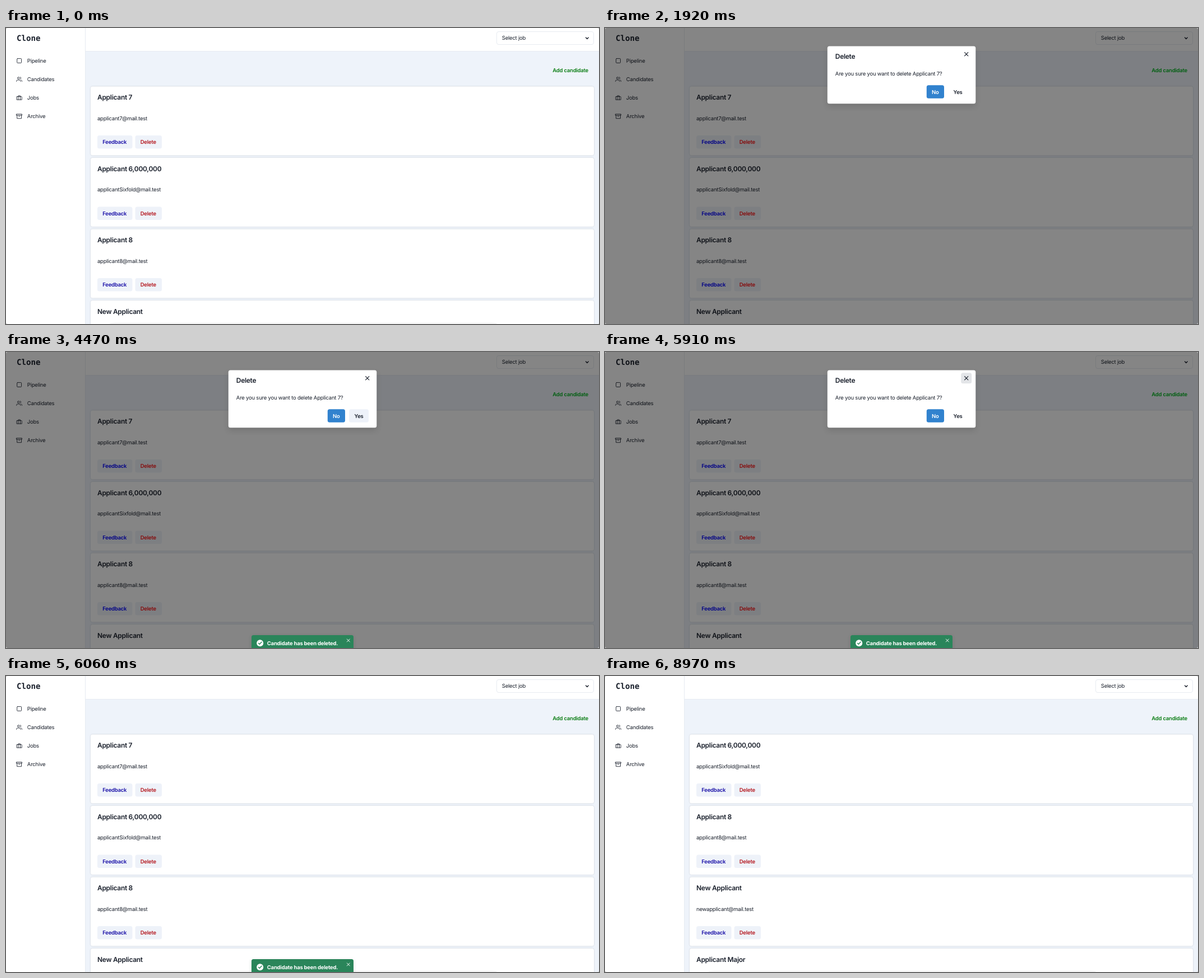
Write an HTML page that moves like this. It is 1058 px wide and 529 px high and loops after 9 s.

```html
<!DOCTYPE html>
<html lang="en">
<head>
<meta charset="utf-8">
<title>Candidates</title>
<style>
  html, body { margin: 0; height: 100%; overflow: hidden; background: #c4c4c4; }
  svg { display: block; width: 100vw; height: 100vh; border-radius: 3px; }
  text { font: 9.5px Inter, sans-serif; letter-spacing: -.023em; fill: #1a202c; white-space: pre; text-rendering: geometricPrecision; }
  .head { font-size: 12px; font-weight: 600; letter-spacing: -.025em; }
  .bold { font-weight: 600; }
  .brand { font: bold 14.1px "DejaVu Sans Mono", monospace; letter-spacing: 0; }
  .blue { fill: var(--blue); }
  .red { fill: var(--red); }
  .green { fill: var(--green); }
  .white { fill: #fff; }
  .card { fill: #fff; filter: drop-shadow(0 .6px .9px rgba(0, 0, 0, .17)); }
  .btn { fill: #eef2f9; }
  .line { fill: none; stroke: #1a202c; stroke-width: 1; stroke-linecap: round; stroke-linejoin: round; }
  .icon { fill: none; stroke: #1a202c; stroke-width: 2; stroke-linecap: round; stroke-linejoin: round; }
  .edge { fill: none; stroke: #e7ebf1; }
  #modal, #toast { transform-box: view-box; }
  #modal { transform-origin: 529px 83.75px; }
  #toast { transform-origin: 529px 520px; }
  .panel { fill: #fff; filter: drop-shadow(0 5px 5px rgba(0, 0, 0, .12)); }
</style>
</head>
<body>
<svg id="stage" viewBox="0 0 1058 529" preserveAspectRatio="none"></svg>
<script>
const people = [
  ['Applicant 7', 'applicant7'],
  ['Applicant 6,000,000', 'applicantSixfold'],
  ['Applicant 8', 'applicant8'],
  ['New Applicant', 'newapplicant'],
  ['Applicant Major', 'applicantmajor']
];

const menu = [
  ['Pipeline', 'M5 3H19a2 2 0 0 1 2 2V19a2 2 0 0 1-2 2H5a2 2 0 0 1-2-2V5a2 2 0 0 1 2-2z'],
  ['Candidates', 'M17 21v-2a4 4 0 0 0-4-4H5a4 4 0 0 0-4 4v2M5 7a4 4 0 1 0 8 0a4 4 0 1 0-8 0M23 21v-2a4 4 0 0 0-3-3.87M16 3.13a4 4 0 0 1 0 7.75'],
  ['Jobs', 'M3 7H21a1.5 1.5 0 0 1 1.5 1.5V20H1.5V8.5A1.5 1.5 0 0 1 3 7zM8 20V3.5H16V20'],
  ['Archive', 'M21 8v13H3V8M1 3h22v5H1zM10 12h4']
];

const text = (x, y, str, cls = '', extra = '') =>
  `<text x="${x}" y="${y}" class="${cls}" ${extra}>${str}</text>`;
const rect = (x, y, w, h, r, attrs) =>
  `<rect x="${x}" y="${y}" width="${w}" height="${h}" rx="${r}" ${attrs}/>`;
const cross = (x, y, r, attrs = '') =>
  `<path class="line" d="M${x - r} ${y - r}L${x + r} ${y + r}M${x + r} ${y - r}L${x - r} ${y + r}" ${attrs}/>`;

const card = ([name, user], i) => `<g transform="translate(0 ${i * 127.5})">
  ${rect(151, 104.5, 898, 123, 3.5, 'class="card"')}
  ${text(163, 128, name, 'head')}
  ${text(163, 164.7, user + '@mail.test')}
  ${rect(163, 192, 62.5, 23.5, 3.5, 'class="btn"')}
  ${rect(230.5, 192, 47.5, 23.5, 3.5, 'class="btn"')}
  ${text(172.2, 207.2, 'Feedback', 'bold blue')}
  ${text(239.7, 207.2, 'Delete', 'bold red')}
</g>`;

const menuItem = ([label, path], i) => {
  const y = 58.5 + i * 33.1;
  return `<path class="icon" d="${path}" transform="translate(18.4 ${y - 5.2}) scale(.435)"/>`
    + text(37.8, y + 3.6, label);
};

const stage = document.getElementById('stage');
stage.innerHTML = `
  <rect width="1058" height="529" fill="#fff"/>
  ${rect(142, 41.5, 916, 488, 0, 'fill="#eef3fa"')}
  <path class="edge" d="M141.5 0V529M142 41.5H1058"/>
  ${text(19, 23.3, 'Clone', 'brand')}
  ${menu.map(menuItem).join('')}
  ${rect(875.5, 6.5, 173, 23, 3.5, 'class="edge"')}
  ${text(884.8, 21.4, 'Select job')}
  <path class="line" d="M1034.5 17l2.3 2.4l2.3-2.4" style="stroke-width:1.4"/>
  ${text(1039, 78.7, 'Add candidate', 'bold green', 'text-anchor="end"')}
  <g id="before">${people.slice(0, 4).map(card).join('')}</g>
  <g id="after">${people.slice(1).map(card).join('')}</g>
  <path id="rim" d="M183 530Q187 527.7 194 527.7H867Q874 527.7 878 530" fill="none" stroke="#e9e9e9"/>
  <path id="glow" d="M165 529Q172 522 200 522H855Q883 522 890 529Z" fill-opacity=".05"/>
  <rect id="dim" width="1058" height="529"/>
  <g id="modal">
    ${rect(396.8, 32.5, 264.5, 102.8, 3.5, 'class="panel"')}
    ${rect(635.2, 37.3, 19, 19, 3.5, 'id="closeHover" fill="#e3e5e8"')}
    ${cross(644.7, 46.7, 3.1, 'style="stroke-width:1.2"')}
    ${text(410.8, 55.3, 'Delete', 'head')}
    ${text(410.8, 84.5, 'Are you sure you want to delete Applicant 7?')}
    ${rect(573.8, 102.3, 31.2, 23.5, 3.5, 'fill="#3182ce"')}
    ${text(583, 117.6, 'No', 'bold white')}
    ${rect(612, 102.3, 35, 23.5, 3.5, 'id="yesHover" class="btn"')}
    ${text(621.6, 117.6, 'Yes', 'bold')}
  </g>
  <g id="toast">
    ${rect(438, 506, 182, 38, 3.5, 'fill="#2a855a" style="filter:drop-shadow(0 2px 3px rgba(0,0,0,.1))"')}
    <circle cx="453.2" cy="520.2" r="6" fill="#fff"/>
    <path class="line" d="M450.5 520.4l1.9 1.9l3.6-4" style="stroke:#2a855a;stroke-width:1.4"/>
    ${text(465.8, 523.7, 'Candidate has been deleted.', 'white', 'style="font-weight:700"')}
    ${cross(610.8, 515.5, 2.5, 'style="stroke:#fff"')}
  </g>`;

const $ = id => document.getElementById(id);
const pressed = $('before').querySelectorAll('.btn')[1];

// Cubic bezier easing, solved by bisection
const bezier = (x1, y1, x2, y2) => x => {
  if (x <= 0) return 0;
  if (x >= 1) return 1;
  const at = (a, b, s) => 3 * (1 - s) ** 2 * s * a + 3 * (1 - s) * s * s * b + s ** 3;
  let lo = 0, hi = 1;
  for (let i = 0; i < 24; i++) {
    const mid = (lo + hi) / 2;
    if (at(x1, x2, mid) < x) lo = mid; else hi = mid;
  }
  return at(y1, y2, lo);
};
const easeOut = bezier(0, 0, .2, 1);
const easeIn = bezier(.4, 0, 1, 1);
const easeInOut = bezier(.4, 0, .2, 1);
const ramp = (t, from, to, ease = easeInOut) => ease((t - from) / (to - from));
const mix = (a, b, p) => `color-mix(in srgb, ${b} ${p * 100}%, ${a})`;

function draw(t) {
  const open = ramp(t, 1350, 1550, easeOut) - ramp(t, 5914, 6014, easeIn);
  const leave = ramp(t, 6750, 6920, easeIn);
  const enter = ramp(t, 3210, 3510);
  const press = ramp(t, 1080, 1280) - ramp(t, 1500, 1700);
  const swap = ramp(t, 5010, 5210);

  $('before').style.display = t < 7320 ? '' : 'none';
  $('after').style.display = t < 7320 ? 'none' : '';
  pressed.style.fill = mix('#eef2f9', '#d3d7df', press);

  $('dim').style.opacity = .48 * open;
  $('rim').style.opacity = 1 - open;
  $('glow').style.opacity = t < 3000 ? 4 * open * (1 - open) : 0;
  stage.style.setProperty('--blue', mix('#1a10a8', '#0000ff', open));
  stage.style.setProperty('--red', mix('#b5181f', '#ff1414', open));
  stage.style.setProperty('--green', mix('#0a7d14', '#00b41e', open));

  $('modal').style.opacity = open;
  $('modal').style.transform = `scale(${.94 + .06 * open})`;
  $('yesHover').style.opacity = ramp(t, 2600, 2760) - swap;
  $('closeHover').style.opacity = swap;

  $('toast').style.opacity = enter * (1 - leave);
  $('toast').style.transform = `translateY(${14 * (1 - enter)}px) scale(${1 - .15 * leave})`;
}

const start = performance.now();
function tick() {
  draw((performance.now() - start) % 9000);
  requestAnimationFrame(tick);
}
tick();
</script>
</body>
</html>
```
